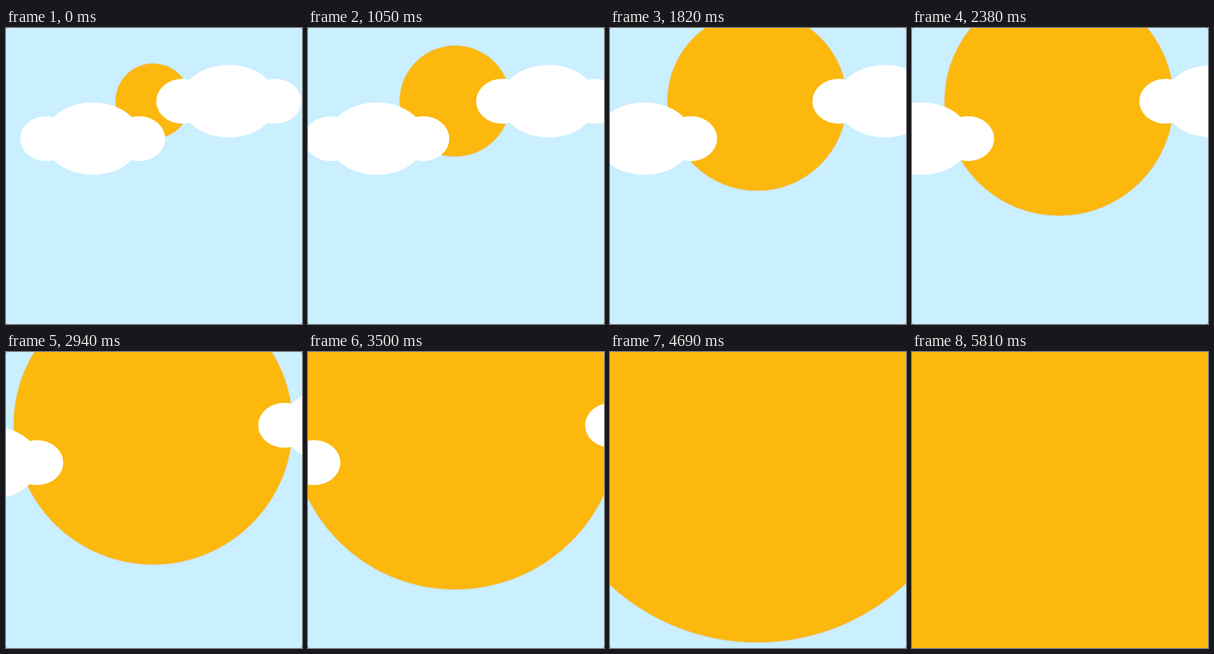
Animation of 396x396 px, one loop 6.02 s. Source, as an HTML page:

```html
<!DOCTYPE html>
<html lang="en">
<head>
<meta charset="utf-8">
<title>Sun and clouds</title>
<style>
  html, body { margin: 0; width: 100%; height: 100%; overflow: hidden; }
  svg { display: block; width: 100%; height: 100%; }
</style>
</head>
<body>
<svg viewBox="0 0 396 396">
  <defs>
    <g id="cloud" fill="#fff">
      <ellipse cx="-62" rx="35" ry="30"/>
      <ellipse cx="62" rx="35" ry="30"/>
      <ellipse rx="65" ry="48.5"/>
    </g>
  </defs>
  <rect width="396" height="396" fill="#5d747e"/>
  <rect width="396" height="396" rx="2" fill="#caefff"/>
  <circle id="sun" cx="196.8" cy="97.8" fill="#fcb80c" stroke="#e6c68c" stroke-width=".8"/>
  <use id="left" href="#cloud"/>
  <use id="right" href="#cloud"/>
</svg>
<script>
const LOOP = 6020, STEP = 70, LAST = 5810;
const START = 648, SPEED = 0.0595; // px per ms
const [sun, left, right] = ['sun', 'left', 'right'].map(id => document.getElementById(id));

const place = (el, x, y) => el.setAttribute('transform', `translate(${x} ${y})`);

function draw(ms) {
  const t = Math.min(LAST, Math.floor(ms % LOOP / STEP) * STEP);
  const shift = Math.max(0, (t - START) * SPEED);
  sun.setAttribute('r', 50.3 + shift);
  place(left, 116 - shift, 148);
  place(right, 298 + shift, 98);
}

const begin = performance.now();
function tick() {
  draw(performance.now() - begin);
  requestAnimationFrame(tick);
}
tick();
</script>
</body>
</html>
```
